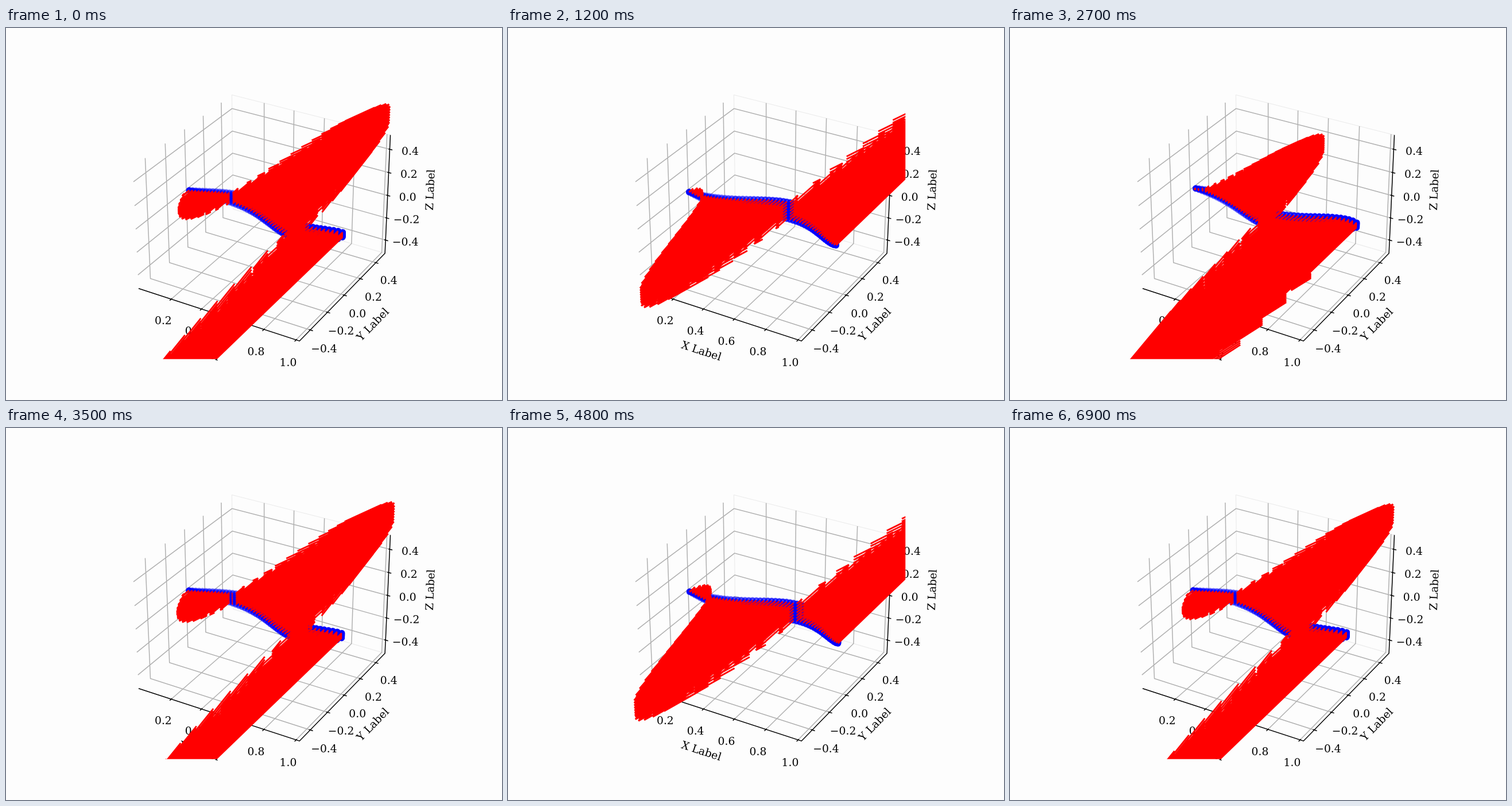
These frames come from a looping animation (864x648 px, 7 s). An HTML page with a canvas:

```html
<!DOCTYPE html>
<html lang="en">
<head>
<meta charset="utf-8">
<title>Undulating body with velocity arrows</title>
<style>
  html, body { margin: 0; width: 100%; height: 100%; overflow: hidden; background: #fdfdfd; }
  canvas { display: block; }
</style>
</head>
<body>
<canvas id="stage" width="864" height="648"></canvas>
<script>
const ctx = document.getElementById('stage').getContext('2d');
const TAU = 2 * Math.PI;
const FRAMES = 70, FRAME_MS = 100, PERIOD = 34.5;
const COLUMNS = 50, ROWS = 7;
const LOW = -0.52083, HIGH = 0.52083;      // y and z limits; x is shifted by 0.5
const X0 = 0.5 + LOW, X1 = 0.5 + HIGH;
const TICKS = [-0.4, -0.2, 0, 0.2, 0.4];
const LABEL_PAD = 0.0864;
const HEAD_COS = 0.3 * Math.cos(Math.PI / 12), HEAD_SIN = 0.3 * Math.sin(Math.PI / 12);

// Perspective view: elevation 30, azimuth -60, distance 10
function project(x, y, z) {
  const a = (x - 0.5) * 1.1429, b = y * 1.1429, c = z * 0.8571;
  const scale = 2697 / (10 - 0.433 * a + 0.75 * b - 0.5 * c);
  return [449.5 + (0.866 * a + 0.5 * b) * scale,
          320.5 - (-0.25 * a + 0.433 * b + 0.866 * c) * scale];
}

function addLine(...points) {
  points.forEach((p, i) => {
    const [x, y] = project(...p);
    if (i) ctx.lineTo(x, y); else ctx.moveTo(x, y);
  });
}

function strokeAll(color, width, build) {
  ctx.strokeStyle = color;
  ctx.lineWidth = width;
  ctx.beginPath();
  build();
  ctx.stroke();
}

function axisLabel(text, x, y, degrees) {
  ctx.save();
  ctx.translate(x, y);
  ctx.rotate(degrees * Math.PI / 180);
  ctx.fillText(text, 0, 6.8);
  ctx.restore();
}

function tickLabel(value, ...position) {
  const [x, y] = project(...position);
  ctx.fillText(value.toFixed(1).replace('-', '\u2212'), x, Math.round(y + 14.2));
}

function drawAxes() {
  strokeAll('#ececec', 1.2, () => {
    addLine([X0, HIGH, LOW], [X0, HIGH, HIGH], [X1, HIGH, HIGH], [X1, HIGH, LOW], [X0, HIGH, LOW]);
  });
  strokeAll('#b0b0b0', 1.5, () => {
    for (const t of TICKS) {
      const x = t + 0.6;
      addLine([x, LOW, LOW], [x, HIGH, LOW], [x, HIGH, HIGH]);
      addLine([X1, t, LOW], [X0, t, LOW], [X0, t, HIGH]);
      addLine([X0, LOW, t], [X0, HIGH, t], [X1, HIGH, t]);
    }
  });
  strokeAll('#000', 1.5, () => {
    addLine([X0, LOW, LOW], [X1, LOW, LOW], [X1, HIGH, LOW], [X1, HIGH, HIGH]);
    for (const t of TICKS) {
      addLine([t + 0.6, LOW - 0.0167, LOW], [t + 0.6, LOW + 0.0083, LOW]);
      addLine([X1 + 0.0167, t, LOW], [X1 - 0.0083, t, LOW]);
      addLine([X1 + 0.0167, HIGH, t], [X1 - 0.0083, HIGH, t]);
    }
  });
  ctx.fillStyle = '#000';
  ctx.font = '18.75px "DejaVu Serif", serif';
  ctx.textAlign = 'center';
  for (const t of TICKS) {
    tickLabel(t + 0.6, t + 0.6, LOW - LABEL_PAD, LOW - LABEL_PAD);
    tickLabel(t, X1 + LABEL_PAD, t, LOW - LABEL_PAD);
    tickLabel(t, X1 + LABEL_PAD, HIGH + LABEL_PAD, t);
  }
  axisLabel('X Label', 337, 562, 18.1);
  axisLabel('Y Label', 638.5, 516, -45.8);
  axisLabel('Z Label', 738.5, 282, -87.5);
}

// Travelling wave along the body
function bodyPoints(phase) {
  const points = [];
  for (let i = 0; i < COLUMNS; i++) {
    const x = i / (COLUMNS - 1);
    const y = (0.028 + 0.06 * x + 0.035 * x * x) * Math.sin(TAU * (x - phase));
    const speed = -(0.076 + 2.74 * x) * Math.cos(TAU * (0.99 * x - phase));
    const height = 0.002 + 0.19 * x * Math.sqrt(1.01 - x);
    for (let j = 0; j < ROWS; j++) {
      points.push({ x, y, z: height * (2 * j / (ROWS - 1) - 1), speed });
    }
  }
  return points;
}

function drawDot({ x, y, z }) {
  const [px, py] = project(x, y, z);
  ctx.globalAlpha = 0.3 + 0.7 * x;
  ctx.beginPath();
  ctx.arc(px, py, 4.2, 0, TAU);
  ctx.fill();
  ctx.stroke();
}

function addArrow({ x, y, z, speed }) {
  const tip = y + speed;
  const back = tip - HEAD_COS * speed, spread = HEAD_SIN * speed;
  addLine([x, y, z], [x, tip, z]);
  addLine([x, back, z + spread], [x, tip, z]);
  addLine([x, back, z - spread], [x, tip, z]);
}

function draw(frame) {
  ctx.fillStyle = '#fdfdfd';
  ctx.fillRect(0, 0, 864, 648);
  drawAxes();

  const points = bodyPoints(frame / PERIOD);
  ctx.save();
  ctx.beginPath();
  ctx.rect(193.3, 77.8, 499, 498.9);
  ctx.clip();
  ctx.fillStyle = ctx.strokeStyle = '#00f';
  ctx.lineWidth = 2.8;
  points.forEach(drawDot);
  ctx.globalAlpha = 1;
  strokeAll('#f00', 2.8, () => points.forEach(addArrow));
  ctx.restore();
}

const start = performance.now();
let shown = -1;
function tick() {
  const frame = Math.floor((performance.now() - start) / FRAME_MS) % FRAMES;
  if (frame !== shown) draw(shown = frame);
  requestAnimationFrame(tick);
}
tick();
</script>
</body>
</html>
```
